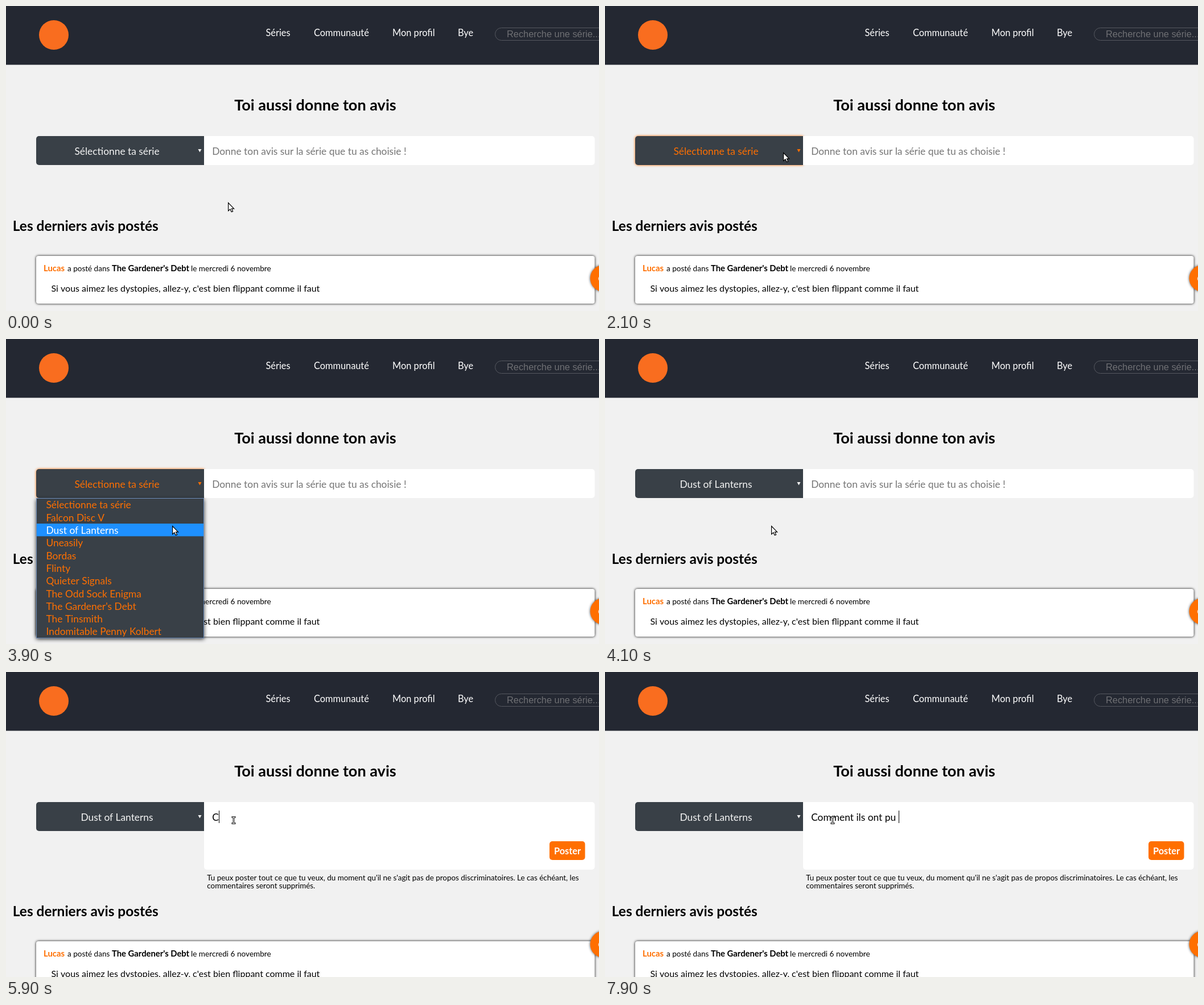
Write an HTML page with a canvas that moves like this. It is 1042 px wide and 537 px high and loops after 8 s.

```html
<!DOCTYPE html>
<html lang="fr">
<head>
<meta charset="utf-8">
<title>Avis</title>
<style>
  html, body { margin: 0; width: 100%; height: 100%; overflow: hidden; background: #f1f1f1; }
  canvas { display: block; }
</style>
</head>
<body>
<canvas id="stage" width="1042" height="537"></canvas>
<script>
const ctx = document.getElementById('stage').getContext('2d');
const LOOP = 8000;
const ORANGE = '#ff6f00', SLATE = '#394047', NAVY = '#242832';
const LATO = 'Lato, sans-serif';
const FIELD_SIZE = 17.36;
const PROMPT = 'Sélectionne ta série';
const CHOICE = 'Dust of Lanterns';
const OPTIONS = [PROMPT, 'Falcon Disc V', CHOICE, 'Uneasily', 'Bordas', 'Flinty',
  'Quieter Signals', 'The Odd Sock Enigma', "The Gardener's Debt", 'The Tinsmith',
  'Indomitable Penny Kolbert'];
const ROW = 22.3;

const MESSAGE = 'Comment ils ont pu ';
// [time, number of characters typed]
const TYPING = [[5300, 0], [5900, 1], [6100, 2], [6400, 5], [6700, 8], [7000, 12], [7400, 16], [7900, 19]];
// [time, x, y] after the first glide
const STOPS = [[2100, 313, 258], [3900, 292, 329], [4400, 336, 300], [4800, 397, 263.5], [5000, 400, 261]];

const lastBefore = (list, t) => list.filter(item => item[0] <= t).pop();

function text(str, x, y, size, color, { weight = 400, align = 'left', family = LATO } = {}) {
  ctx.font = `${weight} ${size}px ${family}`;
  ctx.textAlign = align;
  ctx.fillStyle = color;
  ctx.fillText(str, x, y);
}

function box(x, y, w, h, radii, fill, shadow) {
  ctx.save();
  if (shadow) [ctx.shadowColor, ctx.shadowBlur, ctx.shadowOffsetY] = shadow;
  ctx.fillStyle = fill;
  ctx.beginPath();
  ctx.roundRect(x, y, w, h, radii);
  ctx.fill();
  ctx.restore();
}

function disc(x, y, r, fill) {
  ctx.fillStyle = fill;
  ctx.beginPath();
  ctx.arc(x, y, r, 0, Math.PI * 2);
  ctx.fill();
}

function header() {
  ctx.fillStyle = NAVY;
  ctx.fillRect(0, 0, 1042, 103.5);
  disc(84, 51, 26, '#f96d1f');
  const links = [['Séries', 456.5], ['Communauté', 541], ['Mon profil', 679], ['Bye', 794]];
  for (const [label, x] of links) text(label, x, 52.5, 16.35, '#fff');
  ctx.strokeStyle = '#555860';
  ctx.lineWidth = 1;
  ctx.beginPath();
  ctx.roundRect(859.5, 38.5, 220, 22, 11);
  ctx.stroke();
  text('Recherche une série...', 880, 55, 16.35, '#6f7074', { family: '"Liberation Sans", Arial, sans-serif' });
}

function select(label, hover) {
  box(53, 229, 295, 51, [5, 0, 0, 5], SLATE, hover && [ORANGE, 4, 0]);
  const color = hover ? ORANGE : '#f4f4f4';
  text(label, 195, 262, FIELD_SIZE, color, { align: 'center' });
  ctx.fillStyle = color;
  ctx.beginPath();
  ctx.moveTo(337.5, 252);
  ctx.lineTo(343.5, 252);
  ctx.lineTo(340.5, 257.5);
  ctx.fill();
}

function field(focused, typed) {
  box(348, 229, 686.5, focused ? 119 : 51, focused ? [0, 5, 5, 5] : [0, 5, 5, 0], '#fff');
  const x = 362.2;
  if (typed) text(typed, x, 262, FIELD_SIZE, '#000');
  else text('Donne ton avis sur la série que tu as choisie !', x, 262, FIELD_SIZE, '#757575');
  if (!focused) return;

  ctx.font = `${FIELD_SIZE}px ${LATO}`;
  const caret = Math.round(x + 0.6 + ctx.measureText(typed).width);
  ctx.fillStyle = '#000';
  ctx.fillRect(caret, 244, 1, 22);

  ctx.globalAlpha = typed ? 1 : 0.5;
  box(955, 298, 62.5, 33, 5, ORANGE);
  text('Poster', 986.5, 320.5, 16.35, '#fff', { weight: 700, align: 'center' });
  ctx.globalAlpha = 1;

  text("Tu peux poster tout ce que tu veux, du moment qu'il ne s'agit pas de propos discriminatoires. Le cas échéant, les",
    353.3, 367, 13.4, '#000');
  text('commentaires seront supprimés.', 353.3, 381, 13.4, '#000');
}

function reviews(dy) {
  text('Les derniers avis postés', 11.8, 396 + dy, 24.45, '#000', { weight: 700 });
  box(53, 440 + dy, 981.5, 84, 4, '#fff', ['#000', 4, 0]);
  const y = 467 + dy;
  text('Lucas', 66, y, 14.86, ORANGE, { weight: 700 });
  text('a posté dans', 108, y, 13.5, '#000');
  text("The Gardener's Debt", 186, y, 14.8, '#000', { weight: 700 });
  text('le mercredi 6 novembre', 325, y, 13.6, '#000');
  text("Si vous aimez les dystopies, allez-y, c'est bien flippant comme il faut", 79.5, 503 + dy, 16, '#000');
}

function floatingButton() {
  ctx.save();
  ctx.shadowColor = 'rgba(0,0,0,.7)';
  ctx.shadowBlur = 4;
  disc(1050, 479.5, 23.5, ORANGE);
  ctx.restore();
  ctx.strokeStyle = '#ffe3cc';
  ctx.lineWidth = 1.5;
  ctx.beginPath();
  ctx.arc(1046, 480, 4.5, 2.2, 4.1);
  ctx.stroke();
}

function dropdown(active) {
  box(53, 280, 295, 247, 0, '#6f8fbd', ['rgba(0,0,0,.8)', 7, 1.5]);
  ctx.fillStyle = SLATE;
  ctx.fillRect(54, 281, 293, 245);
  OPTIONS.forEach((label, i) => {
    const top = 280.8 + i * ROW;
    if (i === active) {
      ctx.fillStyle = '#1e90ff';
      ctx.fillRect(54, Math.round(top), 293, ROW);
    }
    text(label, 70.5, top + 17.6, FIELD_SIZE, i === active ? '#fff' : ORANGE);
  });
}

function arrow(x, y) {
  const outline = [[0, 0], [0, 14], [3.3, 11.2], [5.6, 16], [8, 15], [5.9, 10.3], [10, 10.3]];
  ctx.beginPath();
  for (const [px, py] of outline) ctx.lineTo(x + 0.6 + px, y + 0.6 + py);
  ctx.closePath();
  ctx.fillStyle = '#fff';
  ctx.fill();
  ctx.strokeStyle = '#000';
  ctx.lineWidth = 1.2;
  ctx.stroke();
}

function beam(x, y) {
  ctx.beginPath();
  for (const end of [-5.5, 5.5]) {
    ctx.moveTo(x - 2, y + end);
    ctx.lineTo(x + 2, y + end);
  }
  ctx.moveTo(x, y - 5.5);
  ctx.lineTo(x, y + 5.5);
  ctx.lineCap = 'square';
  ctx.strokeStyle = '#222';
  ctx.lineWidth = 3;
  ctx.stroke();
  ctx.strokeStyle = '#fff';
  ctx.lineWidth = 1;
  ctx.stroke();
  ctx.lineCap = 'butt';
}

function pointer(t) {
  const stop = lastBefore(STOPS, t);
  if (stop) return stop.slice(1);
  const step = t < 700 ? 0 : Math.min(8, Math.floor((t - 600) / 100));
  const p = step / 8, eased = p * p * (3 - 2 * p);
  return [390 - 76 * eased, 346 - 87 * eased];
}

function draw(t) {
  const [x, y] = pointer(t);
  const open = t >= 2200 && t < 4100;
  const focused = t >= 5300;
  const hover = open || (t < 4100 && x < 347 && y < 280);
  const typed = focused ? MESSAGE.slice(0, lastBefore(TYPING, t)[1]) : '';

  ctx.fillStyle = '#f1f1f1';
  ctx.fillRect(0, 0, 1042, 537);
  header();
  text('Toi aussi donne ton avis', 543.5, 184.3, 27.05, '#000', { weight: 700, align: 'center' });
  select(t < 4100 ? PROMPT : CHOICE, hover);
  field(focused, typed);
  reviews(focused ? 34 : 0);
  floatingButton();
  if (open) dropdown(t < 3900 ? 0 : 2);
  (t >= 4800 ? beam : arrow)(x, y);
}

function tick() {
  draw(performance.now() % LOOP);
  requestAnimationFrame(tick);
}
tick();
</script>
</body>
</html>
```
